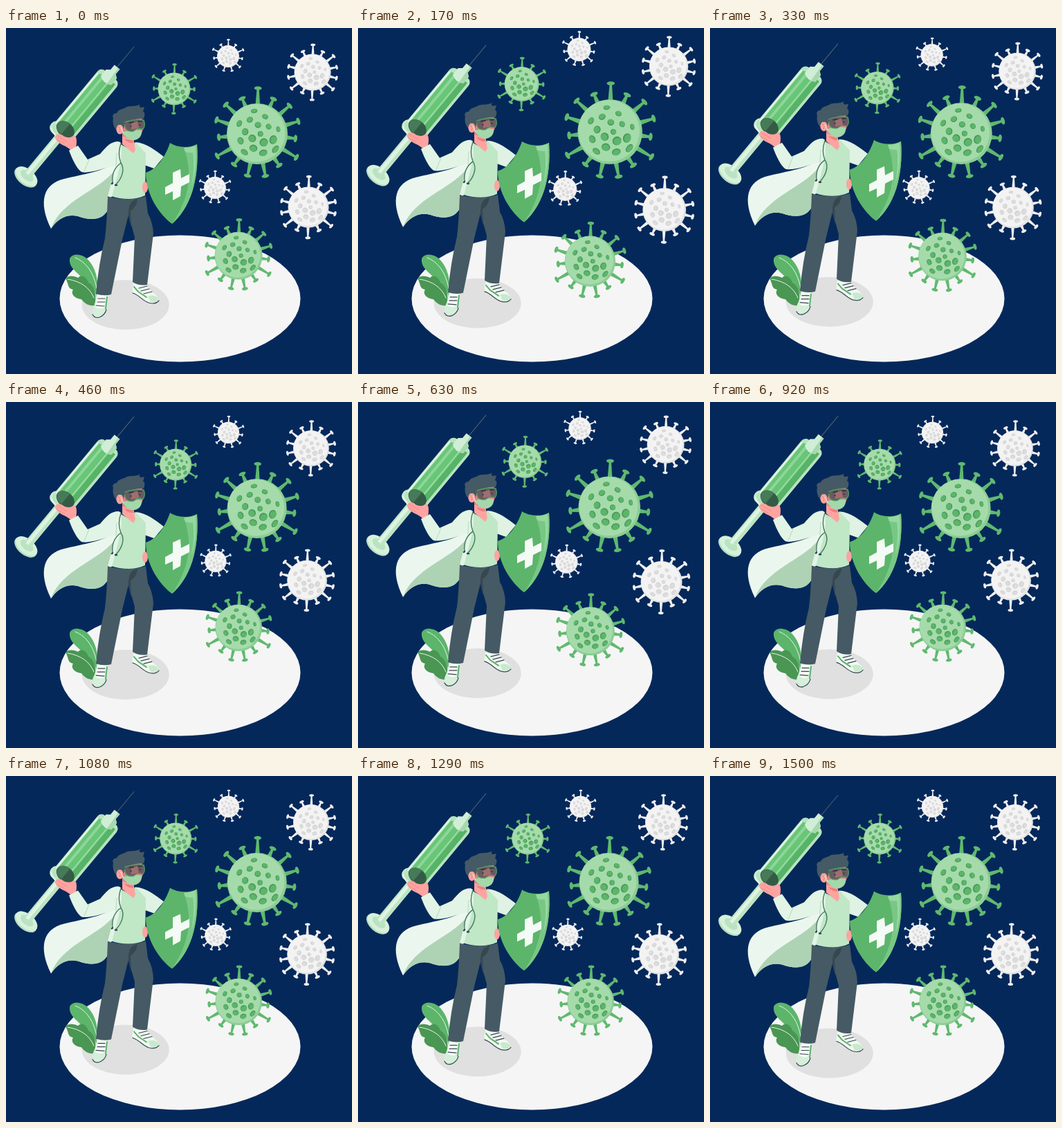
Write an HTML page that moves like this. It is 500x500 px and loops after 1.54 s.

```html
<!DOCTYPE html>
<html lang="en">
<head>
<meta charset="utf-8">
<title>Doctor against viruses</title>
<style>
  html, body { margin: 0; height: 100%; overflow: hidden; background: #05285b; }
  svg { display: block; width: 100vw; height: 100vh; }
  .line { fill: none; stroke-linecap: round; stroke-linejoin: round; }
</style>
</head>
<body>
<svg viewBox="0 0 500 500">
  <ellipse cx="251.5" cy="391" rx="174" ry="91.5" fill="#f5f5f5"/>
  <ellipse class="float" cx="172.7" cy="400" rx="63" ry="36" fill="#e0e0e0"/>

  <g id="leaves">
    <path fill="#5cb56b" d="M92 334C94 325 112 324 122 339C132 352 134 372 132 390L127 378C121 368 112 366 106 357C98 350 91 343 92 334Z"/>
    <path fill="#4a9653" d="M86 362C90 357 99 358 104 361C110 355 117 361 119 368C127 372 132 384 128 401C121 402 114 399 109 392C99 391 93 384 97 378C88 376 91 369 86 362Z"/>
    <path class="line" stroke="#e6f4e8" d="M100 332C116 338 127 354 131 376M89 363C108 366 121 375 127 390"/>
  </g>

  <g class="float">
    <!-- cape -->
    <path fill="#ebf7ee" d="M160 193C140 208 112 211 84 218C54 225 46 251 65 290C74 276 88 268 104 272C126 280 142 276 150 258L156 215Z"/>
    <path fill="#aed3b4" d="M156 207C132 236 80 249 65 290C74 276 88 268 104 272C126 280 142 276 147 262L149 243Z"/>

    <!-- syringe, drawn upright -->
    <g transform="translate(29 215) rotate(39.7)">
      <path class="line" stroke="#536369" d="M0-205V-244"/>
      <ellipse cy="1" rx="19" ry="11" fill="#b5dfbc"/>
      <ellipse cy="-1" rx="18.5" ry="10.500" fill="#d7f1dc"/>
      <ellipse cy="-2" rx="11" ry="6" fill="#b9e3c1"/>
      <path fill="#bde5c4" d="M-6-80H6V-4Q0 0-6-4Z"/>
      <path fill="#dff4e3" d="M-4-80H1V-4H-4Z"/>
      <rect x="-21" y="-92" width="42" height="19" rx="9" fill="#c8ebcf"/>
      <rect x="-18" y="-191" width="36" height="115" rx="8" fill="#b8e3bf"/>
      <path fill="#68c677" d="M-14-182Q0-190 14-182V-88Q0-76-14-88Z"/>
      <path fill="#8fd59a" d="M-9-184H-5V-90H-9Z"/>
      <path fill="#57b367" d="M6-185H14V-88H6Z"/>
      <path fill="#9bdba4" d="M3-185H5V-95H3Z"/>
      <path fill="#d0eed6" d="M-5-206H5V-197L10-193V-181Q0-174-10-181V-193L-5-197Z"/>
      <path fill="#a6d9ae" d="M2-206H5V-197L10-193V-181L4-178Z"/>
      <ellipse cy="-89" rx="14.5" ry="10.5" fill="#345b45"/>
      <path fill="#467a58" d="M-14-91Q-10-100 0-99V-80Q-13-79-14-91Z"/>
      <path class="line" stroke="#e3f6e7" stroke-width="2" d="M-16-181V-87M-17-77Q0-68 17-77"/>
    </g>
    <path fill="#ffa3a0" d="M71 159C70 153 78 151 83 156C88 159 95 159 98 155C102 156 103 162 101 174L94 177C89 170 75 169 71 159Z"/>
    <path class="line" stroke="#ef8583" stroke-width=".8" d="M75 156L88 164M73 161L84 167"/>

    <!-- legs and shoes -->
    <path fill="#d5efda" d="M131 385H147C149 394 146 401 145 408C143 417 136 421 130 419C124 417 124 410 126 404C129 398 131 392 131 385Z"/>
    <path fill="#f4faf5" d="M133 386H145L143 404C136 407 130 405 128 402Z"/>
    <path class="line" stroke="#5bb36b" stroke-width="2" d="M146 389L144 406"/>
    <path class="line" stroke="#37474f" stroke-width="1.2" d="M133 391H143M132 396H143M130 401L142 402M125 414Q128 420 135 418Q143 415 145 407"/>
    <path fill="#f0f8f1" d="M184 369L203 370C205 379 217 384 221 391C221 398 213 399 206 397C197 394 193 386 184 383C181 379 184 375 184 369Z"/>
    <path fill="#c9e9cf" d="M205 388Q214 384 221 391Q220 398 209 396Z"/>
    <path class="line" stroke="#5bb36b" stroke-width="2" d="M185 374L191 381L203 389"/>
    <path class="line" stroke="#37474f" stroke-width="1.2" d="M192 376L204 373M195 380L207 377M199 384L211 381M183 383C193 386 197 394 206 397Q216 400 221 394"/>
    <path fill="#455a64" d="M147 243C160 248 188 249 202 243L205 268Q212 280 213 297L204 371Q192 373 183 367L186 302L177 270L168 306L152 385Q141 388 130 384Q134 340 143 304Q146 277 147 243Z"/>
    <path fill="#37474f" d="M190 247C178 250 177 259 177 272L181 288L180 264C187 259 189 255 190 247Z"/>

    <!-- neck, shirt and coat -->
    <path fill="#dff2e3" d="M187 165C203 166 216 177 228 186L214 203L200 198Z"/>
    <path fill="#c0e7c6" d="M160 165L175 173L187 165L202 181L201 242C187 249 167 248 152 243L158 202Z"/>
    <path fill="#ffa3a0" d="M168 154L184 158L187 176L184 181L168 168Z"/>
    <path fill="#ed7f7e" d="M171 160L184 163L184 166Q176 167 171 160Z"/>
    <path fill="#e2f4e6" d="M163 164C150 164 145 172 136 182L118 190L104 170L91 177C96 190 102 203 109 208C120 211 140 203 159 198L147 243L153 244L163 206Q169 184 166 166Z"/>
    <path class="line" stroke="#b5d9bc" d="M159 198L160 181M113 207L120 190"/>
    <path class="line" stroke="#457a5e" stroke-width="1.4" d="M166 167C161 181 164 190 166 195C173 205 166 219 159 226M166 195C155 203 153 215 154 224"/>
    <path class="line" stroke="#37474f" stroke-width="2.5" d="M153 225L154 224M158 227L160 227"/>

    <!-- head -->
    <path fill="#d98685" d="M166 130L196 125L198 146Q195 160 181 161L168 156Z"/>
    <path fill="#455a64" d="M166 152C157 149 153 138 155 130C153 127 155 123 160 123C163 116 170 118 174 114C181 112 188 114 194 110C191 114 194 116 200 114L198 121C202 122 200 128 199 131Q184 130 172 138L169 149Z"/>
    <ellipse cx="164.5" cy="146.5" rx="5" ry="7" fill="#ffa3a0"/>
    <path class="line" stroke="#e77f7e" d="M162 143Q167 145 164 150"/>
    <path fill="#a3d8aa" d="M168 151L180 147L196 148Q197 159 186 162Q176 163 168 151Z"/>
    <path class="line" stroke="#dff2e3" d="M166 144L170 152"/>
    <path fill="#695b60" stroke="#519862" stroke-width="1.4" d="M172 136Q186 131 199 133Q202 141 198 146L190 145L184 149Q170 151 172 136Z"/>
    <path class="line" stroke="#455a64" stroke-width="2" d="M164 139L172 138"/>
    <path fill="#a36d70" d="M181 138L190 135L192 144L181 147Z"/>
    <path class="line" stroke="#263238" stroke-width="1.5" d="M178 137L184 136M191 135L196 135M180 142H181M193 140H194"/>

    <!-- shield -->
    <ellipse cx="201" cy="230" rx="4" ry="8" fill="#ffa3a0"/>
    <path fill="#5cb56b" d="M202 209C217 205 230 187 237 166C247 173 265 174 276 168C278 195 275 218 269 237C262 258 252 272 240 283C222 270 202 241 202 209Z"/>
    <path fill="#78c785" d="M257 173Q267 173 276 168C278 195 275 218 269 237C262 258 252 272 240 283C262 250 272 215 257 173Z"/>
    <path fill="#97d7a1" d="M257 173Q267 173 274 170C276 195 273 215 268 228Q273 200 270 180Q266 181 259 179Z"/>
    <path fill="#f4faf5" d="M241 209L252 204L253 217L265 211V223L253 229L252 243L241 249V236L230 241V230L241 224Z"/>
  </g>

  <g id="swarm"></g>
</svg>

<script>
const LOOP = 1540, FPS = 24, SPOTS = 17, REST = 1.022;
const green = { body: '#a5dbaa', rim: '#8bcd94', spot: '#5cb56b', deep: '#489956', spike: '#5fb96f' };
const white = { body: '#f3f3f3', rim: '#e3e3e3', spot: '#dcdcdc', deep: '#cfcfcf', spike: '#f0f0f0' };

const viruses = [
  { x: 363, y: 153, r: 44, spikes: 15, color: green },
  { x: 336, y: 329, r: 34.5, spikes: 15, color: green },
  { x: 243, y: 88, r: 23.5, spikes: 12, color: green },
  { x: 443, y: 64, r: 26.5, spikes: 14, color: white },
  { x: 437, y: 259, r: 29.5, spikes: 14, color: white },
  { x: 321, y: 41, r: 16, spikes: 11, color: white },
  { x: 302, y: 231, r: 16, spikes: 11, color: white }
];

const repeat = (n, make) => Array.from({ length: n }, (_, i) => make(i)).join('');

// Knobbed stalks at even angles, long and short in turn
function spike(i, { r, spikes }) {
  const turn = i / spikes;
  const len = r * (1.37 + .13 * Math.cos(12 * Math.PI * turn));
  const base = r * .075, neck = r * .035;
  return `<g transform="rotate(${360 * turn + 1})">
    <path d="M${-base} ${-r * .95}L${-neck} ${-len}H${neck}L${base} ${-r * .95}Z"/>
    <ellipse cy="${-len}" rx="${r * .11 + .6}" ry="${r * .05 + .5}"/></g>`;
}

// Spots on a golden-angle spiral, flattened towards the edge of the ball
function spot(i, { r, color }) {
  const reach = .8 * Math.sqrt((i + .3) / SPOTS);
  const size = r * (.09 + .06 * (i * .618 % 1));
  const flat = size * Math.sqrt(1 - reach * reach);
  return `<g transform="rotate(${i * 137.5}) translate(${reach * r} 0)">
    <ellipse rx="${flat}" ry="${size}" fill="${color.deep}"/>
    <ellipse cx="${flat * .15}" rx="${flat * .82}" ry="${size * .82}" fill="${color.spot}"/></g>`;
}

function virus(v) {
  const { x, y, r, color } = v;
  return `<g transform="translate(${x} ${y})">
    <g fill="${color.spike}">${repeat(v.spikes, i => spike(i, v))}</g>
    <circle r="${r}" fill="${color.rim}"/>
    <circle cx="${-r * .03}" cy="${-r * .03}" r="${r * .95}" fill="${color.body}"/>
    ${repeat(SPOTS, i => spot(i, v))}</g>`;
}

const swarm = document.getElementById('swarm');
swarm.innerHTML = viruses.map(virus).join('');
const floating = document.querySelectorAll('.float');

const bump = (t, from, peak, to) =>
  Math.max(0, Math.min((t - from) / (peak - from), (to - t) / (to - peak)));

function draw(now) {
  const t = Math.floor(now % LOOP * FPS / 1000 + .1) * 1000 / FPS;
  const phase = (t / LOOP + .035) % 1;
  const lift = .7 - 10 * (1 - Math.abs(2 * phase - 1));
  floating.forEach(el => el.setAttribute('transform', `translate(0 ${lift})`));

  // Double heartbeat
  const scale = 1 + .1 * (bump(t, -34, 120, 440) + bump(t, 566, 719, 872));
  swarm.setAttribute('transform', `translate(345.5 200) scale(${scale / REST}) translate(-345.5 -200)`);
}

const start = performance.now();
function tick() {
  draw(performance.now() - start);
  requestAnimationFrame(tick);
}
tick();
</script>
</body>
</html>
```
